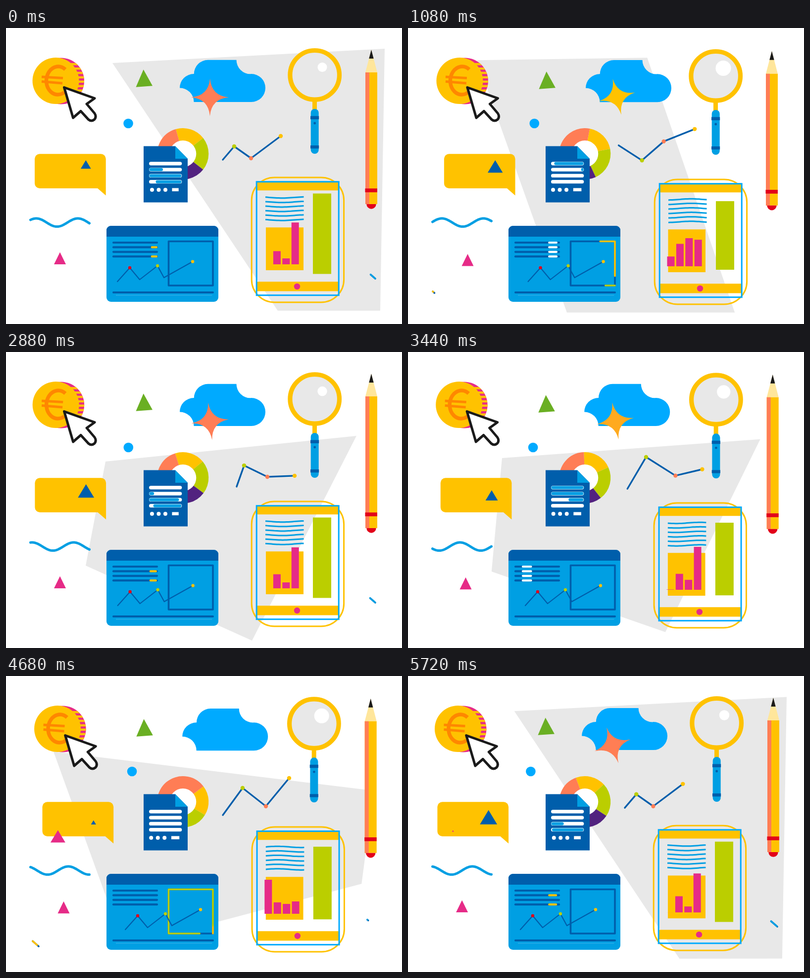
An HTML page with a canvas for the animation above (5.76 s loop, 800 by 600 pixels).

```html
<!DOCTYPE html>
<html lang="en">
<head>
<meta charset="utf-8">
<title>Data tools</title>
<style>
html, body { margin: 0; width: 100%; height: 100%; overflow: hidden; background: #fff; }
canvas { display: block; }
</style>
</head>
<body>
<canvas id="stage" width="800" height="600"></canvas>
<script>
const c = document.getElementById('stage').getContext('2d');
const YELLOW = '#ffc200', ORANGE = '#ff7d55', PINK = '#e62b87', LIME = '#bbce00',
  BLUE = '#009fe3', DARK = '#005eab', SKY = '#00aaff', RED = '#e2001a',
  PURPLE = '#52227f', GREY = '#e8e8e8', BLACK = '#1a1a1a', WHITE = '#fff';
const LOOP = 5760, CYCLE = 2920, TAU = Math.PI * 2;

// --- timing helpers ---

const smooth = u => u * u * (3 - 2 * u);
const ramp = (t, a, b) => smooth(Math.min(1, Math.max(0, (t - a) / (b - a))));
const steep = u => u ** 3.1 / (u ** 3.1 + (1 - u) ** 3.1);

// Out and back once per cycle; `skew` moves the peak, `power` narrows it.
const swing = (u, skew, power) => Math.sin(Math.PI * u ** skew) ** power;

// Blend between key poses; the last time is the return to the first pose.
function morph(poses, times, t, ease) {
  let i = poses.length - 1;
  while (times[i] > t) i--;
  const u = ease((t - times[i]) / (times[i + 1] - times[i]));
  const next = poses[(i + 1) % poses.length];
  return poses[i].map((v, k) => v + (next[k] - v) * u);
}

// --- drawing helpers ---

function fill(color) { c.fillStyle = color; c.fill(); }

function stroke(color, width) { c.strokeStyle = color; c.lineWidth = width; c.stroke(); }

function rect(x0, y0, x1, y1, color, r = 0) {
  c.beginPath();
  c.roundRect(x0, y0, x1 - x0, y1 - y0, r);
  fill(color);
}

function circle(x, y, r, color) {
  c.beginPath();
  c.arc(x, y, r, 0, TAU);
  fill(color);
}

function path(pts) {
  c.beginPath();
  for (let i = 0; i < pts.length; i += 2) c.lineTo(pts[i], pts[i + 1]);
}

function poly(pts, color) { path(pts); c.closePath(); fill(color); }

function line(pts, color, width) { path(pts); stroke(color, width); }

// The part of a straight line between the fractions `tail` and `head`.
function streak(x0, y0, x1, y1, tail, head, color, width) {
  if (head - tail < 0.01) return;
  const x = k => x0 + (x1 - x0) * k, y = k => y0 + (y1 - y0) * k;
  line([x(tail), y(tail), x(head), y(head)], color, width);
}

function triangle(x, top, bottom, color, ratio = 0.6) {
  const h = (bottom - top) * ratio;
  if (h > 0.1) poly([x, top, x + h, bottom, x - h, bottom], color);
}

function at(x, y, draw) {
  c.save();
  c.translate(x, y);
  draw();
  c.restore();
}

// --- parts ---

function backdrop(t) {
  const poses = [
    [215, 71, 765, 42, 756, 573, 549, 573],
    [136, 65, 471, 61, 656, 577, 311, 577],
    [201, 222, 708, 170, 497, 585, 161, 433],
    [95, 154, 743, 234, 718, 420, 236, 548]
  ];
  poly(morph(poses, [0, 1475, 2950, 4425, 5900], t, steep), GREY);
}

function chart(t) {
  const poses = [
    [438, 267, 461, 240, 495, 264, 555, 219],
    [423, 232, 475, 274, 521, 223, 584, 202],
    [466, 273, 481, 230, 528, 253, 583, 251],
    [418, 282, 481, 194, 554, 248, 607, 223],
    [438, 282, 478, 227, 525, 264, 572, 207]
  ];
  const pts = morph(poses, [0, 1460, 2920, 4000, 4680, 5800], t, smooth);
  line(pts, DARK, 3.4);
  [LIME, ORANGE, YELLOW].forEach((color, i) => circle(pts[2 * i + 2], pts[2 * i + 3], 4.2, color));
}

function coin() {
  c.save();
  circle(111, 107.5, 47, PINK);
  c.clip();
  for (let y = 71; y < 145; y += 8.9) rect(128, y, 160, y + 4.5, YELLOW);
  c.restore();
  circle(100.5, 107, 47, YELLOW);
  c.lineCap = 'butt';
  c.beginPath();
  c.ellipse(105, 106.5, 23.5, 28.5, 0.05, -0.95, 0.95, true);
  stroke('#ff8700', 7.5);
  line([72, 99, 115, 101.5], '#ff8700', 4.8);
  line([72, 108.5, 114, 112], '#ff8700', 4.8);
  c.lineCap = 'round';
}

function cursor() {
  c.beginPath();
  c.moveTo(117.5, 120.5);
  c.lineTo(179, 142.5);
  c.lineTo(163, 154);
  c.lineTo(179, 173);
  c.quadraticCurveTo(183.5, 180, 178.5, 185.5);
  c.quadraticCurveTo(172.5, 190.5, 166.5, 185.5);
  c.lineTo(151, 168.5);
  c.lineTo(135.5, 182);
  c.closePath();
  fill(WHITE);
  stroke(BLACK, 5);
}

function cloud() {
  const q = Math.PI / 2;
  c.beginPath();
  c.arc(379.5, 121.5, 28.5, 2 * q, 3 * q);
  c.arc(408, 93, 28.2, 2 * q, 3 * q);
  c.arc(494, 64.8, 28.5, 2 * q, q, true);
  c.arc(495.5, 121.5, 28.5, -q, q);
  c.arc(351, 150, 28.5, 0, -q, true);
  fill(SKY);
}

function sparkle(size, angle, color) {
  c.rotate(angle * Math.PI / 180);
  c.beginPath();
  c.moveTo(0, -size);
  for (let i = 0; i < 4; i++) {
    c.quadraticCurveTo(size * 0.08, -size * 0.08, size, 0);
    c.rotate(TAU / 4);
  }
  fill(color);
}

function magnifier(glint) {
  circle(623.7, 95.3, 50, GREY);
  rect(619, 147, 628, 168, YELLOW);
  c.beginPath();
  c.arc(623.7, 95.3, 49.8, 0, TAU);
  stroke(YELLOW, 9.2);
  rect(615.7, 164, 631.7, 255, BLUE, 8);
  rect(615, 178.5, 632.2, 185, DARK);
  rect(615, 238, 632.2, 244.3, DARK);
  circle(623.7, 193, 2.4, DARK);
  circle(639, 79.5, glint, WHITE);
}

function pencil() {
  poly([738, 44, 750, 90, 726, 90], '#ffe69b');
  poly([738, 44, 742.7, 62, 733.3, 62], BLACK);
  rect(726, 90, 750, 357, YELLOW);
  rect(726, 90, 734, 357, ORANGE);
  rect(725.5, 325.3, 750, 333, RED);
  c.beginPath();
  c.arc(738, 357, 9.7, 0, Math.PI);
  fill(RED);
}

// A triangle that grows up from its base at `a`, then lifts and shrinks into its tip at `b`.
function pop(t, a, b, x, base, size, lift, color) {
  const foot = base - lift * ramp(t, b - 70, b + 20);
  triangle(x, foot - size * ramp(t, a, a + 450), foot - size * ramp(t, b, b + 140), color);
}

function bubble(p, q) {
  rect(58, 255.3, 201.7, 325, YELLOW, [10, 10, 0, 10]);
  poly([184.5, 324.5, 201.7, 324.5, 201.7, 339.5], YELLOW);
  pop(q, 1600, 2860, 161.3, 301, 29, 4, DARK);
  pop(q, 3150, 3970, 161.3, 301, 29, 4, DARK);
  pop(p, 1300, 1839, 89.4, 337.5, 25, 0, PINK);
  pop(p, 2100, 2692, 89.4, 337.5, 25, 0, PINK);
}

function wave(trough) {
  c.beginPath();
  for (let x = 49.5; x <= 168.5; x++) c.lineTo(x, 394.3 + 8.3 * Math.cos((x - trough) / 84 * TAU));
  stroke(BLUE, 5);
}

function dashes(p, q) {
  const left = (head, color) =>
    streak(50, 534, 66, 548, ramp(p, 1250, 2850), head, color, 3.6);
  left(ramp(p, 900, 1500), DARK);
  left(ramp(p, 900, 2100), YELLOW);
  const right = (head, color) =>
    streak(730, 494, 746, 508, ramp(q, 2540, 3400), head, color, 3.6);
  right(ramp(q, 1500, 2800), DARK);
  right(ramp(q, 1650, 3000), BLUE);
}

// The ring turns once per cycle, fastest at 2080 ms.
function pie(p) {
  let a = Math.PI / 2 + 2 * Math.atan(5.6 * Math.tan(Math.PI * (p - 2080) / CYCLE));
  for (const [deg, color] of [[68, YELLOW], [76, LIME], [78, PURPLE], [138, ORANGE]]) {
    const b = a + deg * Math.PI / 180;
    c.beginPath();
    c.moveTo(357.3, 255);
    c.arc(357.3, 255, 52, a, b);
    fill(color);
    a = b;
  }
  circle(357.3, 255, 27, WHITE);
}

function page(q, r) {
  poly([278, 239.5, 342, 239.5, 367, 265, 367, 353.5, 278, 353.5], DARK);
  poly([342, 239.5, 367, 265, 342, 265], BLUE);
  for (let i = 0; i < 4; i++) {
    const y = 311.7 - i * 12.3, on = 2600 + 115 * i, off = 2750 + 380 * i;
    const a = 289 + 66 * ramp(q, off, off + 600), b = 289 + 66 * ramp(q, on, on + 200);
    rect(289, y - 3.6, 355.3, y + 3.6, WHITE, 3.6);
    if (b > a + 1) rect(a + 0.5, y - 3, b - 0.5, y + 3, BLUE, 3);
  }
  for (let i = 0; i < 3; i++) circle(295 - 2 * r + 13.5 * i, 328, 4, WHITE);
  rect(335.5 - 1.7 * r, 324.5, 348.7 + 1.7 * r, 331, WHITE);
}

// Part of the frame's outline, clockwise from its bottom right corner.
function trace(tail, head, color) {
  const a = tail * 358, b = head * 358;
  if (b - a < 0.3) return;
  c.setLineDash([b - a, 999]);
  c.lineDashOffset = -a;
  line([418, 522, 328.5, 522, 328.5, 432.5, 418, 432.5, 418, 522], color, 3.6);
  c.setLineDash([]);
}

function browser(p, q, shift) {
  rect(203, 401, 429, 555, BLUE, 9);
  rect(203, 401, 429, 423, DARK, [9, 9, 0, 0]);
  for (let i = 0; i < 4; i++) {
    const y = 435 + i * 9.4;
    const row = (tail, head, color) => streak(217, y, 305, y, tail, head, color, 4.2);
    row(0, 1, DARK);
    row(ramp(p, 180, 1480), ramp(p, 20, 1260), WHITE);
    if (i % 2) row(ramp(q, 1920, 3190), ramp(q, 1740, 3000), YELLOW);
  }
  line([217, 536, 418, 536], DARK, 4);
  line([222, 541.7, 416, 541.7], '#3fb4ea', 1);
  trace(0, 1, DARK);
  trace(ramp(p, -550, 2110), ramp(p, 50, 1250), YELLOW);
  trace(ramp(p, 1560, 2760), ramp(p, 950, 1880), LIME);
  at(shift, 0, () => {
    line([225, 514, 250, 486, 270, 510, 306, 482, 319, 506, 377, 473.5], DARK, 2.2);
    circle(250, 486, 3.2, RED);
    circle(306, 482, 3.2, LIME);
    circle(377, 473.5, 3.2, YELLOW);
  });
}

function tablet(u, s) {
  rect(507, 313, 671, 329.3, YELLOW);
  rect(507, 514.3, 671, 533.5, YELLOW);
  c.beginPath();
  c.roundRect(496.2, 303, 186.4, 253, 46);
  stroke(YELLOW, 3);
  c.lineJoin = 'miter';
  c.strokeStyle = SKY;
  c.strokeRect(506.2, 311.7, 166, 230);
  c.lineJoin = 'round';
  circle(588, 524, 6.2, PINK);
  c.lineCap = 'butt';
  for (let i = 0; i < 6; i++) {
    c.beginPath();
    for (let k = 0; k <= 20; k++) {
      c.lineTo(524 + k * 3.875, 343.5 + i * 9.1 + 1.2 * Math.sin(k / 4 - 0.6 + u * TAU));
    }
    stroke(BLUE, 3);
  }
  rect(620, 335.5 + 11.5 * s, 657, 498.5 - 12.5 * s, LIME);
  rect(525 - 1.5 * s, 404.3, 601 - 2 * s, 491, YELLOW);
  const heights = [
    69 * swing(u, 1.35, 4),
    35 - 13 * Math.cos(2 * TAU * (u - 0.07)),
    12 + 45 * swing(u, 0.7, 8),
    58 + 33 * Math.cos(TAU * (u - 0.1))
  ];
  heights.forEach((h, i) => rect(521.5 + i * 18.4, 479 - h, 536.5 + i * 18.4, 479, PINK));
}

function draw(t) {
  const p = t % CYCLE, u = p / CYCLE;
  const q = p < 1600 ? p + CYCLE : p; // for moves that run past the end of a cycle
  const s = swing(u, 0.7, 2), r = swing(u, 0.85, 1);
  const dx = 2 * s * s, dy = 4 * s ** 0.7;

  c.clearRect(0, 0, 800, 600);
  c.lineCap = c.lineJoin = 'round';
  backdrop(t);
  at(4 * r, 0, coin);
  at(2.5 * r, 0, cursor);
  at(dx, dy, () => poly([277.7, 84.3, 296, 117.3, 262.5, 119.7], '#6aaf23'));
  circle(247 + 8.5 * r, 193.5, 9.8, SKY);
  at(8 * s, 1.5 * swing(u, 2, 2), cloud);
  const size = 38 * (1 - ramp(p, 1050, 1450) + ramp(p, 2250, 2700));
  const blend = `rgb(255 ${125 + 69 * s} ${85 - 85 * s})`;
  at(412 + 10.5 * r, 140.5 - r, () => sparkle(size, 450 * u, blend));
  at(-2 * s, 2 * s, () => magnifier(9.5 + 6.2 * r));
  at(-1.5 * dx, 2.7 * s, pencil);
  at(16.5 * swing(u, 1, 1.2), 0, () => bubble(p, q));
  wave(103 + 247 * u);
  at(11.5 * s, 3.5 * s, () => triangle(109, 454.5, 479, PINK, 0.49));
  dashes(p, q);
  pie(p);
  page(q, r);
  chart(t);
  browser(p, q, 18 * r);
  at(dx, dy, () => tablet(u, s));
}

const begin = performance.now();
function tick() {
  draw((performance.now() - begin) % LOOP);
  requestAnimationFrame(tick);
}
tick();
</script>
</body>
</html>
```
